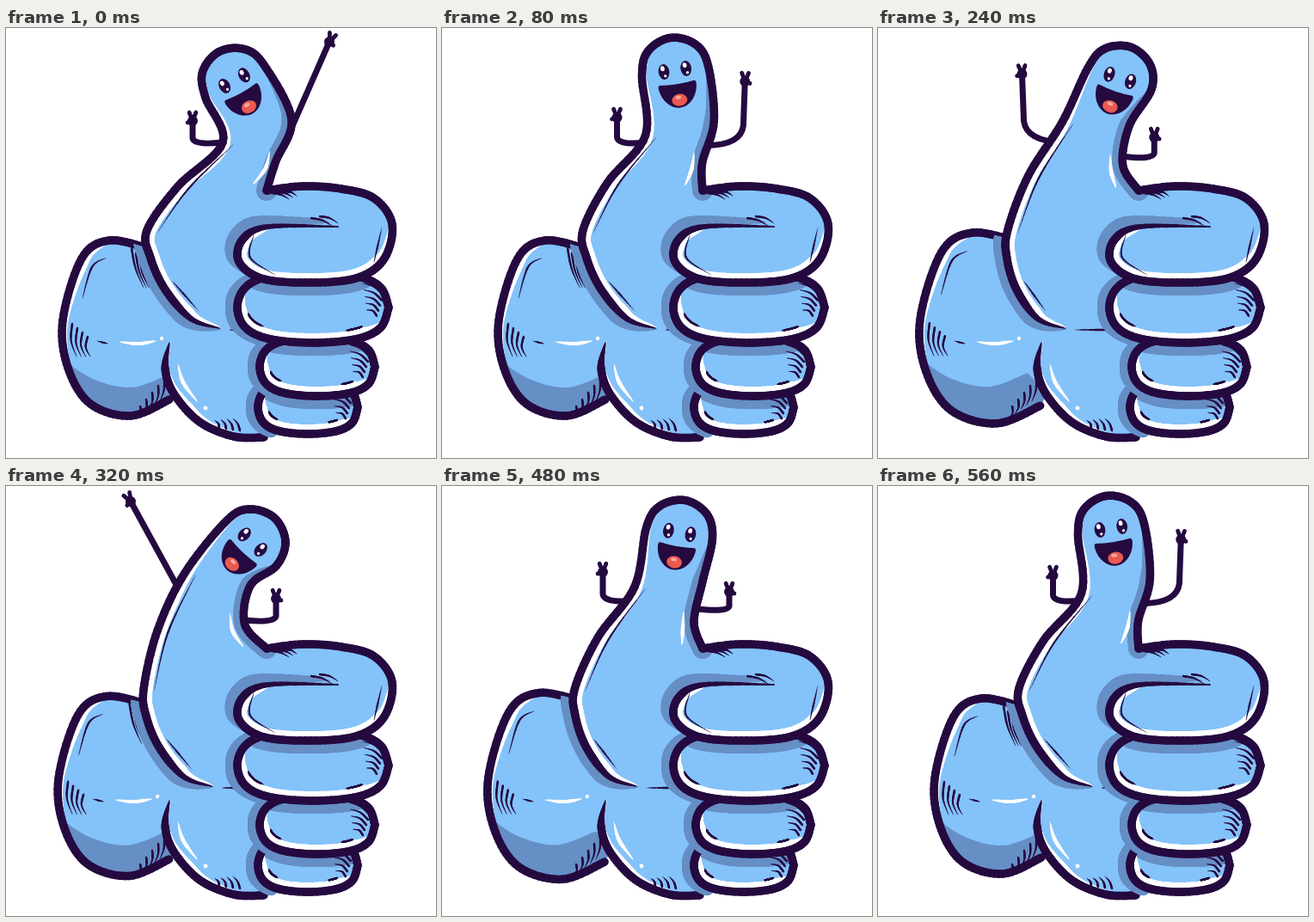
These frames come from a looping animation (500x500 px, 640 ms). An HTML page with a canvas:

```html
<!DOCTYPE html>
<html lang="en">
<head>
<meta charset="utf-8">
<title>Waving thumb</title>
<style>
html, body { margin: 0; width: 100%; height: 100%; overflow: hidden; background: #fff; }
canvas { display: block; width: 500px; height: 500px; }
</style>
</head>
<body>
<canvas id="stage" width="500" height="500"></canvas>
<script>
const ctx = document.getElementById('stage').getContext('2d');
const INK = '#250a40', BLUE = '#84c2fa', SHADE = '#668fc5', WHITE = '#fff';
const STEP = 80, EDGE = 9.5, PI = Math.PI;

// lean runs from -1 (right) to 1 (left); sway pushes the heel of the hand sideways.
const poses = [
  { lean: -1, tilt: -29, headY: 62, sway: 0 },
  { lean: -0.5, tilt: -9, headY: 50, sway: 0 },
  { lean: 0, tilt: 10, headY: 55, sway: -10 },
  { lean: 0.5, tilt: 19, headY: 59, sway: -14 },
  { lean: 1, tilt: 43, headY: 66, sway: -4 }
];

const points = text => text.split(' ').map(p => p.split(',').map(Number));
const heel = points('248,349 215,338 185,304 168,267 164,235');
const wristKeys = points('165,256 120,247 88,268 66,340 72,395 98,437 145,451 190,432');
const palm = points('190,366 185,395 195,425 225,458 265,475 300,476');
const index = points('303,189 345,184 390,187 428,198 449,228 440,268 410,290 360,296 300,292 271,272 275,246 305,231 386,231');
const fingers = [
  { x: 357, y: 325, rx: 88, ry: 41 },
  { x: 362, y: 394, rx: 67, ry: 34 },
  { x: 351, y: 441, rx: 58, ry: 31 }
];
const armRules = [
  { side: -1, x: 187, swing: 36, curl: 6, y: 100, rise: 74 },
  { side: 1, x: 334, swing: 31, curl: 11, y: 123, rise: 99 }
];

const move = (pts, dx, dy) => pts.map(([x, y]) => [x + dx, y + dy]);
const mix = (a, b, k) => a.map((v, i) => v + (b[i] - v) * k);

// Samples a smooth curve through the points.
function smooth(pts, perSpan = 10) {
  const out = [];
  for (let i = 0; i < pts.length - 1; i++) {
    const b = pts[i], c = pts[i + 1], a = pts[i - 1] || b, d = pts[i + 2] || c;
    for (let j = 0; j < perSpan; j++) {
      const t = j / perSpan;
      out.push([0, 1].map(k => b[k] + t / 2 * (c[k] - a[k]
        + t * (2 * a[k] - 5 * b[k] + 4 * c[k] - d[k] + t * (3 * (b[k] - c[k]) + d[k] - a[k])))));
    }
  }
  return [...out, pts.at(-1)];
}

// Brush line; head and tail give the number of samples over which an end thins out.
function brush(pts, color, width, head = 0, tail = 0) {
  const line = smooth(pts), last = line.length - 1;
  ctx.strokeStyle = color;
  for (let i = 0; i < last; i++) {
    const fade = Math.min(1, head ? 0.15 + i / head : 1, tail ? 0.15 + (last - i) / tail : 1);
    ctx.lineWidth = width * fade;
    ctx.beginPath();
    ctx.moveTo(...line[i]);
    ctx.lineTo(...line[i + 1]);
    ctx.stroke();
  }
}

function region(pts, corners = []) {
  const path = new Path2D();
  [...smooth(pts), ...corners].forEach(p => path.lineTo(...p));
  path.closePath();
  return path;
}

function within(area, draw) {
  ctx.save();
  ctx.clip(area);
  draw();
  ctx.restore();
}

function fill(area, color) {
  ctx.fillStyle = color;
  ctx.fill(area);
}

function oval(x, y, rx, ry, color) {
  const path = new Path2D();
  path.ellipse(x, y, rx, ry, 0, 0, 2 * PI);
  fill(path, color);
}

// Bent strokes in a row, each a little shorter than the last.
function hatch(x, y, count, [stepX, stepY], [vx, vy], bend) {
  for (let i = 0; i < count; i++) {
    const k = 1 - i * 0.13;
    const mark = [[0, 0], [vx * k / 2 - vy * bend, vy * k / 2 + vx * bend], [vx * k, vy * k]];
    brush(move(mark, x + i * stepX, y + i * stepY), INK, 2.4, 0, 16);
  }
}

// Part of a finger's rounded outline, clockwise from the right.
function arc({ x, y, rx, ry }, from, to, inset = 0) {
  const round = v => Math.sign(v) * Math.abs(v) ** 0.8;
  return Array.from({ length: 13 }, (_, i) => {
    const angle = (from + (to - from) * i / 12) * PI;
    return [x + (rx - inset) * round(Math.cos(angle)), y + (ry - inset) * round(Math.sin(angle))];
  });
}

function drawFinger(finger, above) {
  const outline = arc(finger, 0, 2), area = region(outline);
  const { x, y, rx, ry } = finger;
  brush(move(arc(finger, 0.7, 1.3), -5, 0), SHADE, 18);
  fill(area, BLUE);
  within(area, () => {
    brush(above, SHADE, 30);
    brush(arc(finger, 0.05, 1.2), WHITE, 22, 30, 30);
    hatch(x + rx - 6, y - ry * 0.35, 5, [-2, 6], [-24, -14], 0.1);
  });
  brush(outline, INK, EDGE);
  brush(arc(finger, 0.25, 0.36, 12), INK, 2.2, 20, 20);
  brush(arc(finger, 0.75, 0.95, 12), INK, 2.2, 20, 20);
}

function drawArm({ side, x, swing, curl, y, rise }, shoulder, lean) {
  const u = -side * lean, raise = Math.max(0, u);
  const hand = [x + side * (swing * u + curl * u * u), y - 8 * u - rise * raise ** 0.8];
  const corner = [hand[0], shoulder[1] + 4];
  const elbow = mix(corner, mix(shoulder, hand, 0.5), raise ** 3);
  const bend = new Path2D();
  bend.moveTo(...shoulder);
  bend.quadraticCurveTo(...mix(shoulder, elbow, 0.95), ...mix(elbow, hand, 0.3));
  bend.lineTo(...hand);
  ctx.strokeStyle = INK;
  ctx.lineWidth = 7;
  ctx.stroke(bend);

  ctx.save();
  ctx.translate(...hand);
  ctx.rotate(Math.atan2(hand[0] - elbow[0], elbow[1] - hand[1]));
  oval(0, 0, 6, 6, INK);
  for (const tip of [[-4, -10], [4, -10], [side * 6, 2]]) brush([[0, 0], tip], INK, 4.5);
  ctx.restore();
}

function drawWrist(sway) {
  const wrist = wristKeys.map(([x, y]) =>
    [x + sway * (200 - x) / 110, y + sway * (350 - y) / 160]);
  const area = region(wrist, [[215, 395], [275, 375], [250, 320], [190, 270]]);
  const [x, y] = wrist[3];
  fill(area, BLUE);
  within(area, () => {
    const lit = [[x, y + 45], [x + 35, y + 68], [x + 80, y + 78], [x + 125, y + 62]];
    fill(region(lit, [[240, 470], [x - 10, 470]]), SHADE);
    brush(wrist.slice(1, 5), WHITE, 20, 12, 22);
  });
  brush(wrist, INK, EDGE);
  brush(move(mix2(wrist[1], wrist[2], wrist[3]), 12, 10), INK, 2.4, 12, 12);
  hatch(x + 11, y + 4, 4, [6, 5], [5, 38], 0.1);
  hatch(146 + sway * 0.6, 256 + sway * 0.6, 4, [5, 6], [14, 46], 0.05);
  hatch(184, 408, 5, [-7, 8], [-5, 26], -0.08);
  brush([[x + 66, 365], [x + 88, 367], [x + 108, 364]], WHITE, 4, 8, 8);
  oval(x + 115, 361, 2.2, 2.2, WHITE);
  brush([[x + 40, 364], [x + 52, 367]], INK, 2, 5, 5);
  return area;
}

// Short stretch of a curve around its middle point.
function mix2(a, b, c) {
  return [mix(a, b, 0.5), b, mix(b, c, 0.5)];
}

function thumbOutline({ lean, tilt, headY, sway }) {
  const base = heel.map(([x, y]) => [x + sway * (1 + (y - 240) / 90), y]);
  const neck = [
    [224 - 22 * lean + 6 * lean ** 2, 117 - 16 * lean],
    [303 - 24 * lean + 5 * lean ** 2, 111 + 5 * lean]
  ];
  const [back] = move([mix(neck[0], base.at(-1), 0.5)], -8, 0);
  const [nape] = move([mix(neck[1], index[0], 0.5)], -10 - 6 * lean, 8);
  const head = [276 + 10 * lean, headY];
  const tip = [-90, -45, 0, 45, 90].map(angle => {
    const a = (angle + tilt) * PI / 180;
    return [head[0] + 39 * Math.sin(a), head[1] - 39 * Math.cos(a)];
  });
  return { head, neck, nape, line: [...base, back, neck[0], ...tip, neck[1], nape, index[0]] };
}

function drawThumb({ line, nape }, lean) {
  const area = region(line, [[340, 202], [420, 215], [400, 290], [300, 345]]);
  fill(area, BLUE);
  within(area, () => {
    brush(line.slice(-4), SHADE, 24, 12);
    brush(line.slice(0, 9), WHITE, 21, 14, 30);
  });
  brush(line, INK, EDGE, 18);
  brush(move(line.slice(4, 7), 12, 3), INK, 2.2, 12, 12);
  brush(move(line.slice(1, 3), 9, -9), INK, 2.2, 6, 6);

  const x = nape[0] - 12 - 5 * lean, y = nape[1] - 12;
  brush([[x, y], [x - 1 + 4 * lean, y + 20], [x - 2 + 17 * lean, y + 38]], WHITE, 4.5, 10, 10);
  const [fx, fy] = line[0];
  brush([[fx + 12, fy + 2], [275, 351]], INK, 2.6, 6, 0);
}

function drawIndex() {
  const area = region(index);
  brush(move(index.slice(-5), -6, -6), SHADE, 17, 0, 16);
  fill(area, BLUE);
  within(area, () => brush(index.slice(4, -1), WHITE, 22, 14, 16));
  brush(index, INK, EDGE, 0, 22);
  brush(move(index.slice(4, 6), -12, 4), INK, 2.2, 6, 6);
  brush(move(index.slice(8, 11), 13, -5), INK, 2.2, 12, 12);
  hatch(310, 192, 3, [7, -1], [19, 7], -0.08);
  hatch(355, 221, 2, [10, -2], [24, 9], -0.08);
}

function drawFace([x, y], tilt) {
  ctx.save();
  ctx.translate(x, y);
  ctx.rotate(tilt * PI / 180);
  for (const side of [-13, 13]) {
    oval(side, -1, 6.3, 9, INK);
    oval(side - 1, -5, 2.4, 3, WHITE);
    oval(side + 1, 4, 1.6, 1.6, WHITE);
  }
  const mouth = new Path2D('M-20 14Q0 17 20 14Q23 14 22 20C20 34 10 43 0 43S-20 34-22 20Q-23 14-20 14Z');
  fill(mouth, INK);
  oval(0, 34, 9, 7, '#e85a50');
  oval(-1, 31, 3.5, 2, '#f9a79c');
  ctx.restore();
}

function drawPose(pose) {
  const { lean, tilt, sway } = pose;
  const thumb = thumbOutline(pose);
  const [neckLeft, neckRight] = thumb.neck;

  ctx.clearRect(0, 0, 500, 500);
  drawArm(armRules[0], [neckLeft[0], 133], lean);
  drawArm(armRules[1], [neckRight[0] - 6, 143 + 13 * lean], lean);

  const wristArea = drawWrist(sway);
  const palmArea = region(palm, [[340, 440], [300, 330], [240, 335], [212, 348]]);
  fill(palmArea, BLUE);
  within(palmArea, () => brush(palm, WHITE, 19, 30, 30));
  brush(palm, INK, EDGE, 12);
  brush([[200, 391], [206, 412], [222, 434]], WHITE, 4.5, 10, 10);
  oval(232, 442, 2.4, 2.4, WHITE);
  hatch(272, 468, 4, [-8, -1], [-8, -14], 0.1);
  within(wristArea, () => brush(thumb.line.slice(0, 6), SHADE, 28, 14));

  drawThumb(thumb, lean);
  for (let i = fingers.length - 1; i >= 0; i--) {
    drawFinger(fingers[i], i ? arc(fingers[i - 1], 0, 1) : index.slice(5, 10));
  }
  drawIndex();
  drawFace(thumb.head, tilt);
}

ctx.lineCap = ctx.lineJoin = 'round';
let shown;

// Swings through the poses and back again.
function tick() {
  const turn = poses.length - 1;
  const step = Math.floor(performance.now() / STEP) % (2 * turn);
  const pose = poses[turn - Math.abs(turn - step)];
  if (pose !== shown) drawPose(shown = pose);
  requestAnimationFrame(tick);
}
tick();
</script>
</body>
</html>
```
